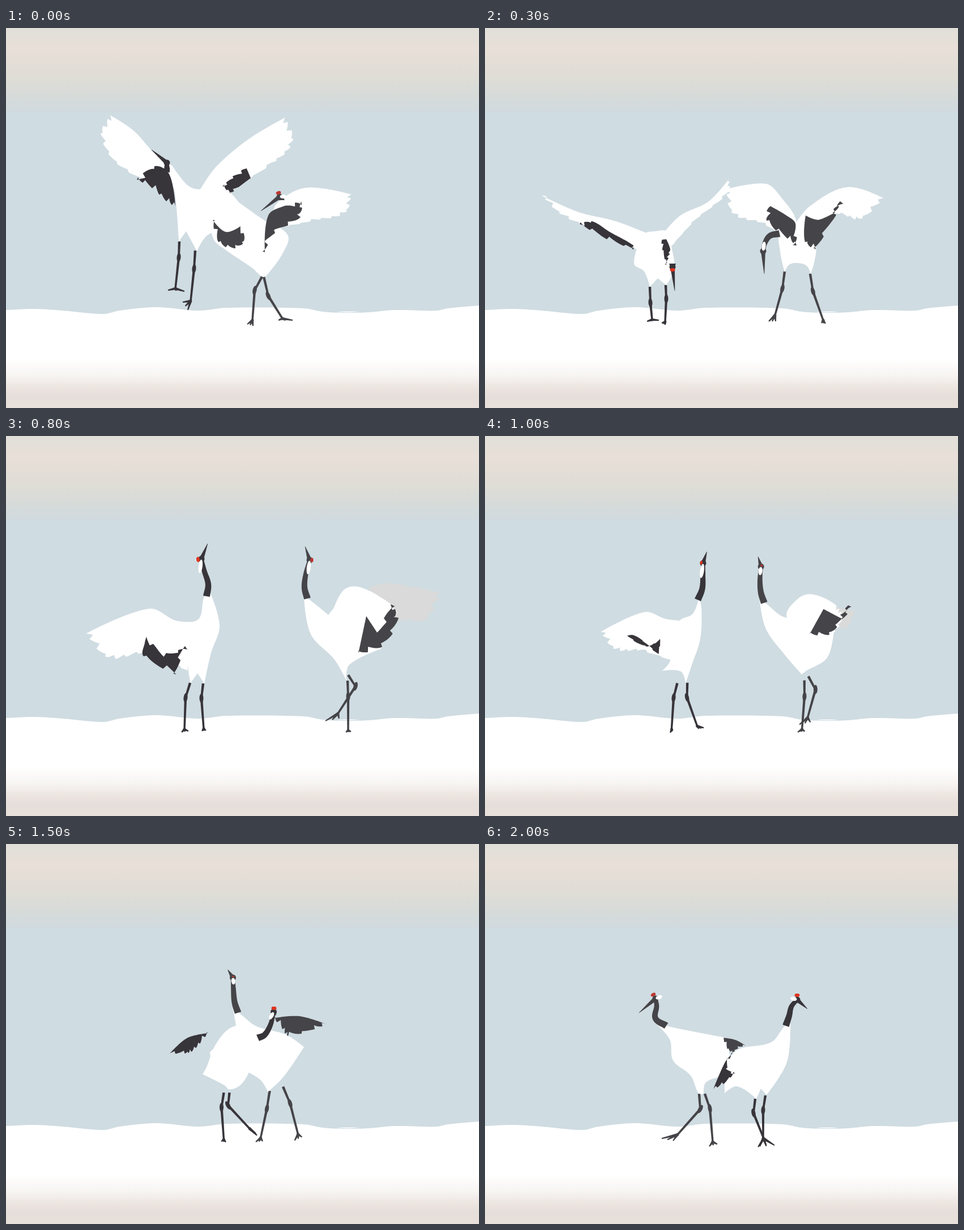
An HTML page with a canvas that plays this animation: 835x671 px, repeating every 2100 ms.

```html
<!DOCTYPE html>
<html lang="en">
<head>
<meta charset="utf-8">
<title>Dancing cranes</title>
<style>
html, body { margin: 0; width: 100%; height: 100%; overflow: hidden; background: #cfdce2; }
canvas { display: block; }
</style>
</head>
<body>
<canvas id="stage" width="835" height="671"></canvas>
<script>
const ctx = document.getElementById('stage').getContext('2d');
const STEP = 100, STEPS = 21, DETAIL = 24;

// Joints of the rig; a part that is left out folds into the body.
//   left, right, far: wing as root, two on the leading edge, tip, two trailing, end
//   patchL, patchR:   dark feathers as three smooth and three ragged points
//   head:             neck (three points), head, bill tip, crown, face
//   leg1, leg2:       hip, knee, ankle, two toes
const SIZES = { left: 7, right: 7, far: 7, patchL: 6, patchR: 6, head: 7, leg1: 5, leg2: 5 };

const poses = [
  { step: 0,
    left: {
      body: '285,236 297,250 330,283 386,283 430,338 357,365 337,394 318,359 305,377 298,290',
      left: '298,250 260,219 225,181 184,154 167,190 205,248 298,285',
      right: '340,290 370,246 430,195 493,158 507,200 470,240 380,290',
      patchL: '262,244 288,258 299,316 283,306 258,283 231,268',
      patchR: '424,246 432,265 412,280 397,293 382,280 400,262',
      head: '283,254 284,249 284,244 284,238 257,215 284,238 284,238',
      leg1: '306,377 305,405 299,460 286,463 315,465',
      leg2: '334,393 332,425 326,482 312,484 321,498' },
    right: {
      body: '365,335 400,300 458,341 497,365 490,395 459,438 452,439 435,424 388,392 366,372',
      right: '470,335 480,308 530,282 610,294 600,326 545,340 480,350',
      patchL: '365,339 388,360 414,350 425,374 405,389 375,378',
      patchR: '457,396 463,331 492,314 521,306 520,334 475,362',
      head: '486,304 486,303 485,301 483,298 450,323 481,291 494,297',
      leg1: '452,439 439,463 435,516 426,523 436,526',
      leg2: '455,439 463,473 488,513 481,516 506,516' } },
  { step: 3,
    left: {
      body: '282,364 300,359 322,360 330,390 334,426 320,454 305,442 291,457 281,430 263,415',
      left: '290,364 230,341 165,325 100,296 135,330 200,360 285,400',
      right: '315,362 345,331 395,306 431,266 430,290 370,341 330,385',
      patchL: '188,341 220,360 262,384 263,391 215,373 167,346',
      patchR: '311,374 320,373 327,391 324,406 320,418 313,392',
      head: '331,416 331,418 331,420 331,422 335,464 331,427 331,422',
      leg1: '291,457 292,485 295,515 286,518 307,516',
      leg2: '319,454 320,478 318,519 312,521 318,524' },
    right: {
      body: '521,357 549,342 583,385 582,410 575,434 568,420 552,415 537,418 529,431 521,395',
      left: '550,345 522,298 495,275 425,285 437,328 490,346 530,370',
      right: '545,350 573,315 640,281 704,301 662,338 620,330 575,385',
      patchL: '501,313 532,331 548,345 550,384 534,372 497,340',
      patchR: '565,378 566,331 592,338 627,306 620,330 584,391',
      head: '520,363 503,367 494,380 491,394 493,434 491,394 493,378',
      leg1: '529,430 525,460 512,507 501,518 513,518',
      leg2: '574,434 579,465 597,516 601,522 594,521' } },
  { step: 5,
    left: {
      body: '325,358 342,336 368,328 374,340 363,360 362,415 345,458 328,447 323,453 270,437',
      left: '325,358 255,331 195,324 126,304 140,358 195,378 330,430',
      right: '362,375 363,361 400,354 435,353 434,385 405,417 362,417',
      patchL: '305,424 250,412 195,379 209,357 255,372 315,405',
      patchR: '361,405 368,402 372,402 371,410 365,414 360,420',
      head: '362,331 380,331 397,342 404,357 403,403 408,357 401,347',
      leg1: '323,453 321,478 319,528 329,531 316,533',
      leg2: '345,458 338,487 344,528 347,531 343,533' },
    right: {
      body: '560,345 586,331 620,331 640,350 663,392 622,427 612,424 597,434 590,400 575,375',
      left: '590,335 546,307 515,329 471,350 490,386 540,386 590,372',
      right: '620,331 683,286 745,309 796,324 768,364 712,367 650,390',
      patchL: '552,358 592,382 602,355 611,378 596,425 543,389',
      patchR: '639,341 676,361 702,328 710,362 672,410 631,383',
      head: '523,388 523,389 523,390 523,391 536,432 523,391 523,391',
      leg1: '598,434 606,463 607,515 601,521 612,520',
      leg2: '621,427 627,457 632,512 619,520 643,521' } },
  { step: 8,
    left: {
      body: '341,322 350,283 361,278 377,335 362,383 350,437 338,419 326,436 322,415 318,330',
      left: '335,328 300,326 252,305 141,349 180,392 245,385 320,415',
      patchL: '243,389 245,365 248,354 283,383 316,371 300,421',
      head: '354,283 357,262 350,238 345,217 356,190 339,218 342,241',
      leg1: '325,436 317,462 315,518 322,521 310,523',
      leg2: '348,437 345,463 349,517 353,520 346,521' },
    right: {
      body: '526,285 537,290 569,316 600,290 640,310 662,376 606,404 601,432 580,395 538,350',
      right: '575,315 596,272 625,267 680,297 692,312 665,350 640,375',
      far: '640,268 670,260 710,265 768,277 742,325 715,327 670,318',
      patchR: '622,384 636,318 655,347 679,297 693,321 664,372',
      head: '532,287 527,268 529,245 536,219 528,195 540,219 533,243',
      leg1: '603,432 604,460 604,520 600,523 609,522',
      leg2: '604,422 617,442 586,490 564,503 588,499' } },
  { step: 13,
    left: {
      body: '405,302 420,289 414,345 384,395 370,435 360,437 357,411 292,383 333,373 380,324',
      left: '378,324 350,319 325,320 298,342 303,355 325,372 380,385',
      patchL: '330,318 285,331 255,351 286,355 299,343 315,330',
      head: '408,299 423,282 437,258 445,236 445,226 446,232 441,262',
      leg1: '361,437 357,462 351,518 346,520 353,525',
      leg2: '371,434 374,460 413,505 436,508 425,511' },
    right: {
      body: '422,290 440,309 470,326 535,356 582,354 520,410 507,432 496,404 455,376 432,325',
      right: '470,328 485,312 505,298 528,300 540,330 540,350 500,390',
      patchR: '500,298 540,287 594,287 585,302 540,318 524,319',
      head: '434,306 427,288 420,268 414,248 413,240 411,243 414,248',
      leg1: '505,431 504,460 493,515 480,523 498,521',
      leg2: '521,428 533,456 545,508 542,519 554,515' } },
  { step: 17,
    left: {
      body: '383,350 430,345 470,363 483,388 462,412 430,430 414,441 402,430 375,415 358,388',
      patchL: '383,350 355,354 323,389 345,385 356,391 370,375',
      head: '481,386 490,392 497,380 500,357 508,379 500,348 490,356',
      leg1: '408,441 404,468 418,526 414,530 423,528',
      leg2: '418,444 410,463 447,500 445,513 461,518' },
    right: {
      body: '378,287 392,295 415,318 453,317 470,363 460,412 418,443 403,430 362,395 383,340',
      patchR: '445,317 495,321 539,350 505,352 456,360 452,335',
      head: '385,290 380,270 383,245 387,224 370,204 391,225 390,247',
      leg1: '426,441 417,475 406,523 402,529 408,529',
      leg2: '457,429 470,460 486,517 477,528 491,520' } },
  { step: 20,
    left: {
      body: '527,324 539,313 533,385 497,443 487,432 479,450 445,428 423,440 437,370 505,350',
      patchL: '437,370 424,385 403,433 421,424 441,405 428,395',
      head: '531,321 537,303 541,287 551,275 569,291 551,267 540,272',
      leg1: '477,450 474,475 492,520 482,535 511,532',
      leg2: '495,444 491,470 491,520 485,534 508,530' },
    right: {
      body: '298,314 328,323 425,342 430,400 390,421 386,441 377,440 363,409 332,382 326,345',
      patchR: '420,342 442,346 460,356 447,361 438,369 428,362',
      head: '320,321 301,308 303,286 301,273 272,298 297,266 312,269',
      leg1: '378,441 380,468 340,513 312,520 332,524',
      leg2: '388,441 397,467 402,526 396,534 410,530' } }
];

const parse = s => s.split(' ').map(p => p.split(',').map(Number));
const dist = (a, b) => Math.hypot(b[0] - a[0], b[1] - a[1]);
const lerp = (a, b, u) => [a[0] + (b[0] - a[0]) * u, a[1] + (b[1] - a[1]) * u];
const cross = (a, b) => a[0] * b[1] - a[1] * b[0];

function rig(bird) {
  const body = parse(bird.body);
  const middle = [0, 1].map(d => body.reduce((sum, p) => sum + p[d], 0) / body.length);
  const out = { body };
  for (const part in SIZES)
    out[part] = bird[part] ? parse(bird[part]) : Array(SIZES[part]).fill(middle);
  return out;
}
const keys = poses.map(p => ({ step: p.step, left: rig(p.left), right: rig(p.right) }));

function between(a, b, u) {
  const out = {};
  for (const part in a) out[part] = a[part].map((p, i) => lerp(p, b[part][i], u));
  return out;
}

// Spline through the points; sharp turns stay corners.
function curve(p, closed) {
  const n = p.length, out = [];
  const at = i => closed ? p[(i + n) % n] : p[Math.max(0, Math.min(n - 1, i))];
  const tangent = i => {
    const a = at(i - 1), c = at(i), b = at(i + 1), len = dist(a, b) || 1;
    const dot = (c[0] - a[0]) * (b[0] - c[0]) + (c[1] - a[1]) * (b[1] - c[1]);
    return dot < 0.3 * dist(a, c) * dist(c, b) ? [0, 0] : [(b[0] - a[0]) / len, (b[1] - a[1]) / len];
  };
  for (let i = 0; i < (closed ? n : n - 1); i++) {
    const a = at(i), b = at(i + 1), ta = tangent(i), tb = tangent(i + 1), h = dist(a, b) * 0.34;
    for (let k = 0; k < DETAIL; k++) {
      const t = k / DETAIL, s = 1 - t;
      out.push([0, 1].map(d => s ** 3 * a[d] + 3 * s * s * t * (a[d] + ta[d] * h) +
        3 * s * t * t * (b[d] - tb[d] * h) + t ** 3 * b[d]));
    }
  }
  if (!closed) out.push(p[n - 1]);
  return out;
}

// Outline whose edge from point `first` to point `last` is cut into feathers.
function feathered(points, first, last, count, depth, fade) {
  const edge = curve(points, true), n = edge.length;
  const area = edge.reduce((sum, p, i) => sum + cross(p, edge[(i + 1) % n]), 0) / 2;
  const size = depth * Math.sqrt(Math.abs(area)) * Math.sign(area);
  const start = first * DETAIL, span = (last - first) * DETAIL;
  return edge.map((p, i) => {
    const t = (i - start) / span;
    if (t <= 0 || t >= 1) return p;
    const a = edge[i - 1], b = edge[(i + 1) % n], len = dist(a, b) || 1;
    const feather = Math.floor(t * count), phase = t * count - feather;
    const inset = size * phase ** 1.5 * (1 - fade * t) * (0.75 + 0.25 * Math.sin(feather * 2.4));
    return [p[0] - (b[1] - a[1]) / len * inset, p[1] + (b[0] - a[0]) / len * inset];
  });
}
const wing = p => feathered(p, 3, 6, 10, 0.13, 0.9);
const patch = p => feathered(p, 2, 6, 8, 0.2, 0);

function fill(poly, color) {
  ctx.fillStyle = color;
  ctx.beginPath();
  poly.forEach(p => ctx.lineTo(p[0], p[1]));
  ctx.fill();
}

// Ribbon along a path, its width running from w0 to w1.
function taper(path, w0, w1, color) {
  const side = sign => path.map((p, i) => {
    const a = path[Math.max(0, i - 1)], b = path[Math.min(path.length - 1, i + 1)];
    const r = sign * (w0 + (w1 - w0) * i / (path.length - 1)) / 2 / (dist(a, b) || 1);
    return [p[0] - (b[1] - a[1]) * r, p[1] + (b[0] - a[0]) * r];
  });
  fill([...side(1), ...side(-1).reverse()], color);
}

function oval(c, rx, ry, angle, color) {
  ctx.fillStyle = color;
  ctx.beginPath();
  ctx.ellipse(c[0], c[1], rx, ry, angle, 0, 7);
  ctx.fill();
}
const heading = (a, b) => Math.atan2(b[1] - a[1], b[0] - a[0]);

function drawLeg([hip, knee, ankle, toe1, toe2], color) {
  taper([hip, knee], 4.5, 3.6, color);
  taper([knee, ankle], 4.4, 3.4, color);
  oval(knee, 8, 3.5, heading(hip, ankle), color);
  oval(ankle, 2.4, 2.4, 0, color);
  for (const toe of [toe1, toe2, lerp(toe1, toe2, 0.5)]) taper([ankle, toe], 4.6, 2, color);
}

function drawHead([base, low, high, head, bill, crown, face], dark, red) {
  taper(curve([base, low, high, head], false), 12, 7, dark);
  oval(head, 5.5, 5.5, 0, dark);
  taper([head, bill], 8, 0.6, dark);
  const reach = dist(head, face), cap = Math.min(4.5, dist(head, crown));
  oval(lerp(head, face, 0.55), reach / 2, Math.min(3.5, reach / 3), heading(head, face), '#fff');
  oval(crown, cap, cap * 0.65, heading(head, crown) + Math.PI / 2, red);
}

function gradient(y0, y1, stops) {
  const g = ctx.createLinearGradient(0, y0, 0, y1);
  stops.forEach(([y, c]) => g.addColorStop((y - y0) / (y1 - y0), c));
  return g;
}

const sky = gradient(0, 150, [[0, '#e1dfd9'], [38, '#e8dfd8'], [85, '#dfddd6'], [120, '#d6dbda'], [147, '#d1dade'], [150, '#cfdce2']]);
const ground = gradient(585, 671, [[585, '#fff'], [612, '#f8f5f3'], [640, '#eae2dd'], [652, '#e6deda'], [671, '#e9e0db']]);
const snow = curve(parse('0,498 50,496 100,499 172,505 200,499 265,493 340,499 390,494 525,495 560,501 600,503 640,502 685,498 760,499 780,495 835,490'), false);

function scenery() {
  ctx.fillStyle = sky;
  ctx.fillRect(0, 0, 835, 671);
  fill([...snow, [835, 671], [0, 671]], ground);
  oval([604, 501.3], 18, 0.8, 0, '#fff');
}

function draw(step) {
  const i = keys.findLastIndex(k => k.step <= step);
  const a = keys[i], b = keys[i + 1] || a;
  const u = (step - a.step) / (b.step - a.step || 1);
  const birds = [
    { ...between(a.right, b.right, u), dark: '#454448', red: '#bd362f' },
    { ...between(a.left, b.left, u), dark: '#37343a', red: '#e0331f' }
  ];
  scenery();
  for (const bird of birds) {
    fill(wing(bird.far), '#d9dad9');
    drawLeg(bird.leg1, bird.dark);
    drawLeg(bird.leg2, bird.dark);
  }
  for (const bird of birds) {
    fill(wing(bird.left), '#fff');
    fill(wing(bird.right), '#fff');
    fill(curve(bird.body, true), '#fff');
  }
  for (const bird of birds) {
    fill(patch(bird.patchL), bird.dark);
    fill(patch(bird.patchR), bird.dark);
    drawHead(bird.head, bird.dark, bird.red);
  }
}

const start = performance.now();
let shown = -1;
function tick() {
  const step = Math.floor((performance.now() - start) / STEP) % STEPS;
  if (step !== shown) draw(shown = step);
  requestAnimationFrame(tick);
}
tick();
</script>
</body>
</html>
```
